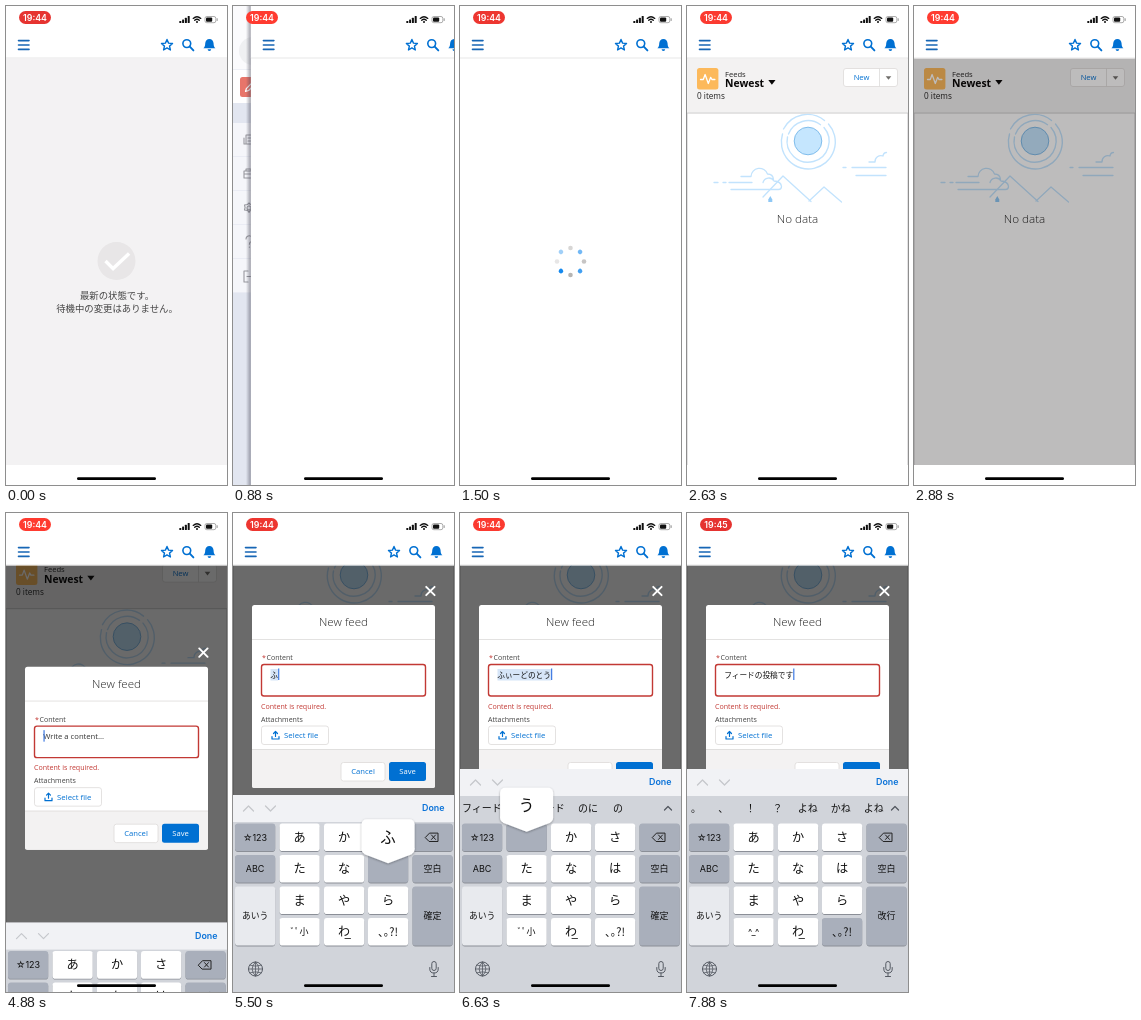
An HTML page for the animation above (8000 ms loop, 221 px wide and 479 px high).

```html
<!DOCTYPE html>
<html lang="ja">
<head>
<meta charset="utf-8">
<title>Mobile feed form</title>
<style>
  html, body { margin: 0; width: 100%; height: 100%; overflow: hidden; background: #fff; }
  svg { display: block; width: 221px; height: 479px; }
  text { font-family: "Open Sans", "Noto Sans CJK JP", "Noto Sans CJK", sans-serif; white-space: pre; }
  .jp { font-family: "Noto Sans CJK JP", "Noto Sans CJK", sans-serif; }
  .ui { font-family: Inter, "Noto Sans CJK JP", sans-serif; }
  .line { fill: none; stroke-linecap: round; stroke-linejoin: round; }
</style>
</head>
<body>
<svg id="stage" viewBox="0 0 221 479" xmlns="http://www.w3.org/2000/svg"></svg>
<script>
const LOOP = 8000;
const BLUE = '#0070d2', RED = '#c23934', DARK = '#a9afbb', BOARD = '#d1d4da';

// Markup helpers
const text = (x, y, size, str, more = '') => `<text x="${x}" y="${y}" font-size="${size}" ${more}>${str}</text>`;
const rect = (x, y, w, h, fill, more = '') => `<rect x="${x}" y="${y}" width="${w}" height="${h}" fill="${fill}" ${more}/>`;
const line = (d, stroke, width = 1, more = '') => `<path class="line" d="${d}" stroke="${stroke}" stroke-width="${width}" ${more}/>`;
const circle = (x, y, r, more) => `<circle cx="${x}" cy="${y}" r="${r}" ${more}/>`;
const MID = 'text-anchor="middle" ';

function starPoints(cx, cy, r) {
  return Array.from({ length: 10 }, (_, i) => {
    const a = i * Math.PI / 5 - Math.PI / 2, d = i % 2 ? r * .46 : r;
    return (cx + d * Math.cos(a)).toFixed(2) + ',' + (cy + d * Math.sin(a)).toFixed(2);
  }).join(' ');
}

function drawer() {
  const labels = ['保留中の変更', 'アプリケーション', '設定', 'ヘルプ', 'ログアウト'];
  const icons = [
    'M13 129h6v9h-6zM11 132v6h2M15 132h3M15 135h3',
    'M11 165h9v7h-9zM13 165v-2h5v2M11 168h9',
    'M16 197l1.5 1.5 3 .5-.6 2.5.6 2.5-3 .5-1.5 1.8-1.5-1.8-3-.5.6-2.5-.6-2.5 3-.5zM18 202a2 2 0 1 1-4 0a2 2 0 1 1 4 0',
    'M13 233a3.2 3.2 0 1 1 5 2.6q-1.6 1-1.6 2.6M16.4 241v.3',
    'M15 265h-4v11h4M14 270.5h8m-2.5-2.5l2.5 2.5-2.5 2.5'];
  return rect(0, 0, 221, 479, '#e2e6f0') + rect(0, 0, 221, 63.5, '#fbfbfd') +
    circle(20, 45, 14, 'fill="#eff0f2"') + text(42, 48, 8.4, 'ユーザー', 'fill="#333"') +
    rect(0, 64, 221, 33, '#fff', 'id="feedRow"') + rect(7, 71, 20, 20, '#e8756a', 'rx="2.5"') +
    line('M12.5 85.5l1-3.2 6.5-6.5 2.2 2.2-6.5 6.5z', '#fff', 1.2) +
    text(36, 84, 8.4, 'Feeds', 'fill="#333"') +
    labels.map((s, i) => rect(0, 117 + i * 34, 221, 33.4, '#f5f6fa') +
      line(icons[i], '#97989e', 1.1) +
      text(36, 137 + i * 34, 8.2, s, 'fill="#444"')).join('');
}

function header() {
  return rect(0, 0, 221, 52, '#fff') + rect(0, 51.6, 221, .8, '#e2e1e1') +
    line('M12.5 34.6h10.5M12.5 39h10.5M12.5 43.4h10.5', '#1766b5', 1.6) +
    `<polygon class="line" points="${starPoints(161, 39.3, 5.8)}" stroke="${BLUE}" stroke-width="1.4"/>` +
    circle(180.8, 37.6, 3.9, `fill="none" stroke="${BLUE}" stroke-width="1.6"`) +
    line('M183.8 40.6l3.6 3.8', BLUE, 1.9) +
    `<path fill="${BLUE}" d="M197.4 42.2c1.6-1.2 1.7-2.6 1.8-4.6 .1-2.8 1.8-4.6 4.2-4.6s4.1 1.8 4.2 4.6c.1 2 .2 3.4 1.8 4.6zM201.6 43.3h3.6a1.8 1.8 0 0 1-3.6 0z"/>`;
}

function pendingPage() {
  return rect(0, 52.4, 221, 406.6, '#f3f2f3') + circle(110.5, 255, 19, 'fill="#e8e6e7"') +
    line('M99.5 255l7.6 7.6 16-15', '#fff', 3.4, 'style="stroke-linecap:butt;stroke-linejoin:miter"') +
    text(111, 293, 9.4, '最新の状態です。', MID + 'class="jp" fill="#444"') +
    text(111, 306, 9.4, '待機中の変更はありません。', MID + 'class="jp" fill="#444"');
}

function listHeader() {
  return rect(0, 52, 221, 55, '#f3f2f2') + rect(0, 106.6, 221, .9, '#c9c7c8') +
    rect(10, 62, 21.4, 21.4, '#fcb95b', 'rx="2.5"') +
    line('M13.5 73.5h2.8l1.8-5 3.2 9 2.4-6.2 1.2 2.2h3', '#fff', 1.3) +
    text(38, 70.6, 7.6, 'Feeds', 'fill="#222"') +
    text(38, 81, 10.4, 'Newest', 'font-weight="700" fill="#080707"') +
    '<path d="M81.3 74h7.2l-3.6 4.8z" fill="#080707"/>' +
    text(10, 93.3, 8.2, '0 items', 'fill="#222"') +
    rect(156.5, 62.5, 54, 18, '#fff', 'id="newBtn" rx="2.5" stroke="#dddbda" stroke-width=".8"') +
    rect(192, 62.5, .8, 18, '#dddbda') +
    text(174.5, 74.3, 7.6, 'New', MID + `fill="${BLUE}"`) +
    '<path d="M198.7 70.2h5.6l-2.8 3.6z" fill="#706e6b"/>';
}

function emptyArt() {
  const pale = '#c2e3fd';
  return line('M96.5 123a27 27 0 0 1 41-8.5M141.5 118a27 27 0 1 1-46 10', pale, 1.4) +
    line('M101.5 128a21 21 0 0 1 32-9.3M137 121.5a21 21 0 1 1-36.5 9.5', pale, 1.4) +
    circle(121, 135, 13.8, 'fill="#c5e6fe" stroke="#80bdec" stroke-width="1"') +
    line('M76 191l20-21 28 25.5M122 195l15-14 17.5 15', pale, 1.3) +
    line('M42 176.5h23M27 176.5h4M36 176.5h3M44 183.5h48M54 170.5h10a8.5 8.5 0 0 1 16.5-2.5q5.5 0 6 5.5M76 176.5a6 6 0 0 1 11-1.5q7 .5 7.5 5.5 0 3-3 3', pale, 1.3) +
    line('M156 161.5h3M165 161.5h34M169 169.5h30M182 156h6a6 6 0 0 1 8-6q.5-3.5 3.5-3.5', pale, 1.3) +
    '<path d="M81.3 196v-2.5l2-3.5 2 3.5v2.5z" fill="#8fc8f5"/>' +
    text(110.5, 217, 11.7, 'No data', MID + 'font-weight="300" fill="#222"');
}

function spinner() {
  return Array.from({ length: 8 }, (_, i) =>
    `<circle r="2.3" cx="13.5" transform="rotate(${i * 45})" fill="${i % 2 ? '#1589ee' : '#b0adab'}" opacity="${.3 + i * .1}"/>`).join('');
}

// Drawn from the top edge of the dialog
function modal() {
  const border = 'rx="2.5" stroke="#dddbda" stroke-width=".8"';
  return line('M193.2 -18.2l8.4 8.4m0-8.4l-8.4 8.4', '#fff', 1.9) +
    rect(19, 0, 183, 171, '#fff', 'id="card" rx="2.5"') + rect(19, 34, 183, .8, '#dddbda') +
    text(110.5, 21, 11.6, 'New feed', MID + 'font-weight="300" fill="#222"') +
    text(29, 55, 7.07, '*', `fill="${RED}"`) + text(33.5, 55, 7.07, 'Content', 'fill="#444"') +
    rect(28.5, 59.5, 164, 31.5, '#fff', 'id="field" rx="2.5"') +
    rect(37.5, 64, 0, 11.5, '#d6e5f8', 'id="mark"') +
    text(37.3, 72.3, 7.66, 'Write a content...', 'id="hint" fill="#333"') +
    text(37.3, 72.6, 7.66, '', 'id="typed" class="jp" fill="#111"') +
    rect(37.5, 63.5, 1.1, 11.5, '#2f6fe0', 'id="caret"') +
    text(28, 103.6, 7.07, 'Content is required.', `id="error" fill="${RED}"`) +
    '<g id="lower">' + text(28, 104.5, 7.07, 'Attachments', 'fill="#444"') +
    rect(28.5, 109, 67, 18.5, '#fff', border) +
    line('M39 119.5v2.5h7v-2.5M42.5 119.5v-5m-2 2l2-2 2 2', BLUE, 1.2) +
    text(51, 121, 7.8, 'Select file', `fill="${BLUE}"`) +
    '<path d="M19 132h183v36.5q0 2.5-2.5 2.5h-178q-2.5 0-2.5-2.5z" fill="#f3f2f2"/>' +
    rect(19, 132, 183, .8, '#dddbda') +
    rect(108, 145.5, 44, 18.5, '#fff', border) + text(130, 157.4, 7.66, 'Cancel', MID + `fill="${BLUE}"`) +
    rect(156, 145, 37, 19, BLUE, 'id="save" rx="2.5"') + text(174.5, 157.4, 7.66, 'Save', MID + 'fill="#fff"') +
    '</g>';
}

const COLS = [2, 46.5, 91, 135, 179.5], ROWS = [310.5, 342, 373.5, 405];
const KANA = ['あかさ', 'たなは', 'まやら', '小わ、'];
const KEY_W = 40.2, KEY_H = 27.6;

function key(x, y, h, fill, label, size, id = '') {
  return rect(x, y + .8, KEY_W, h, '#8b8f97', 'rx="2.8"') +
    rect(x, y, KEY_W, h, fill, `rx="2.8" id="key${id}"`) +
    text(x + KEY_W / 2, y + h / 2 + size * .37, size, label, MID + `class="${size > 10 ? 'jp' : 'ui'}" id="cap${id}" fill="#111"`);
}

function keyboard() {
  const tall = KEY_H + 31.5;
  const faces = { '小': ['^_^', 9], 'わ': ['わ', 12], '、': ['､｡?!', 11] };
  const kana = KANA.map((row, r) => [...row].map((k, c) => {
    const [face, size] = faces[k] || [k, 12.2];
    return key(COLS[c + 1], ROWS[r], KEY_H, '#fff', face, size, k);
  }).join('')).join('');
  return rect(0, 282, 221, 220, BOARD) +
    '<g id="words" clip-path="url(#wordClip)"></g>' +
    line('M204.5 297l3.5-3.5 3.5 3.5', '#50555d', 1.2, 'id="more"') +
    '<g id="bar">' + rect(0, 282, 221, 27, '#f1f2f5') +
    line('M10.5 298l5-5 5 5M32.5 293l5 5 5-5', '#c6c8cc', 1.3) +
    text(211.5, 298.4, 8.9, 'Done', 'class="ui" text-anchor="end" font-weight="600" fill="#0a72d8"') + '</g>' +
    key(COLS[0], ROWS[0], KEY_H, DARK, '☆123', 9) + key(COLS[0], ROWS[1], KEY_H, DARK, 'ABC', 9) +
    key(COLS[0], ROWS[2], tall, '#e8eaee', 'あいう', 8.8) +
    key(COLS[4], ROWS[0], KEY_H, DARK, '', 9) + key(COLS[4], ROWS[1], KEY_H, DARK, '空白', 9) +
    key(COLS[4], ROWS[2], tall, DARK, '改行', 9, 'Enter') +
    line('M192.5 324.3l4-4.2h8.5v8.4h-8.5zM198.5 322l4 4.4m0-4.4l-4 4.4', '#222', 1) + kana +
    line('M112 425.5h5.5', '#111', .8) +
    circle(22.5, 456, 7, 'fill="none" stroke="#555a63"') +
    line('M15.5 456h14M22.5 449v14M22.5 449q-7 7 0 14M22.5 449q7 7 0 14M17 452.2q5.5 2 11 0M17 459.8q5.5-2 11 0', '#555a63', .8) +
    rect(198.8, 448.5, 4.4, 9, 'none', 'rx="2.2" stroke="#555a63"') +
    line('M196.8 454.5v1.5q0 4 4.2 4t4.2-4v-1.5M201 460v3.5M198.5 463.5h5', '#555a63') +
    '<g id="pop" filter="url(#soft)"></g>';
}

function statusBar() {
  const bars = [2, 3.6, 5.2, 7].map((h, i) => rect(173.3 + i * 2.8, 17 - h, 2, h, '#111', 'rx=".5"')).join('');
  return rect(13, 5, 32, 13, '#ff3b30', 'id="pill" rx="6.5"') +
    text(29, 14.7, 8.8, '19:44', MID + 'id="clock" class="ui" font-weight="600" fill="#fff"') + bars +
    line('M187.2 12.4q3.8-3.4 7.6 0M188.7 14.2q2.3-2 4.6 0', '#111', 1.3) + circle(191, 16, 1, 'fill="#111"') +
    rect(199, 10.5, 10.8, 6.2, 'none', 'rx="1.8" stroke="#8a8a8a" stroke-width=".7"') +
    rect(200, 11.5, 6.2, 4.2, '#111', 'rx="1"') + rect(210.7, 12.3, .9, 2.6, '#8a8a8a');
}

document.getElementById('stage').innerHTML = `
  <defs>
    <clipPath id="pageClip"><rect y="52.4" width="221" height="406.6"/></clipPath>
    <clipPath id="wordClip"><rect y="282" width="196.5" height="27"/></clipPath>
    <linearGradient id="edge"><stop offset="0" stop-color="#445" stop-opacity="0"/><stop offset="1" stop-color="#445" stop-opacity=".5"/></linearGradient>
    <filter id="soft" x="-30%" y="-30%" width="160%" height="160%"><feDropShadow dx="0" dy=".8" stdDeviation="1.2" flood-opacity=".35"/></filter>
  </defs>
  ${drawer()}
  <g id="main">
    ${rect(-5, 0, 5, 479, 'url(#edge)')}${rect(0, 0, 221, 479, '#fff')}
    <g clip-path="url(#pageClip)">
      <g id="pending">${pendingPage()}</g>
      <g id="list">
        ${rect(0, 52, .8, 480, '#dddbdc')}${rect(220.2, 52, .8, 480, '#dddbdc')}
        ${listHeader()}<g id="art">${emptyArt()}</g>
      </g>
      <g id="spin">${spinner()}</g>
      ${rect(0, 52, 221, 408, '#080707', 'id="shade"')}
      <g id="modal">${modal()}</g>
    </g>
    ${header()}
  </g>
  <g id="board">${keyboard()}</g>
  ${statusBar()}
  ${rect(71, 471.3, 79, 2.8, '#000', 'rx="1.4"')}`;

const $ = id => document.getElementById(id);
const set = (id, name, value) => $(id).setAttribute(name, value);
const move = (id, x, y) => set(id, 'transform', `translate(${x} ${y})`);
const show = (id, on) => set(id, 'opacity', Number(on));
const within = (t, a, b) => t >= a && t < b;

// Eased value between [time, value] points, held before the first and after the last
function track(t, [first, ...rest]) {
  let [t0, v0] = first;
  for (const [t1, v1] of rest) {
    if (t < t1) {
      const left = 1 - Math.max(0, t - t0) / (t1 - t0);
      return v1 + (v0 - v1) * left * left;
    }
    [t0, v0] = [t1, v1];
  }
  return v0;
}

// time, text in the field, key, flick direction, flicked kana
const TYPING = [
  [5480, 'ふ', 'は', 'up', 'ふ'],
  [5730, 'ふい', 'あ', 'left', 'い'],
  [5855, 'ふぃ', '小'],
  [5980, 'ふぃー', 'わ', 'right', 'ー'],
  [6105, 'ふぃーと', 'た', 'down', 'と'],
  [6230, 'ふぃーど', '小'],
  [6355, 'ふぃーどの', 'な', 'down', 'の'],
  [6480, 'ふぃーどのと', 'た', 'down', 'と'],
  [6605, 'ふぃーどのとう', 'あ', 'up', 'う'],
  [6730, 'ふぃーどのとうこ', 'か', 'down', 'こ'],
  [6855, 'ふぃーどのとうこう', 'あ', 'up', 'う'],
  [6980, 'ふぃーどのとうこうて', 'た', 'right', 'て'],
  [7230, 'ふぃーどのとうこうで', '小'],
  [7355, 'ふぃーどのとうこうです', 'さ', 'up', 'す'],
  [7480, 'フィードの投稿です'],
  [7860, 'フィードの投稿です', '、']
];
const COMMIT = 7480;
const WORDS = [
  [5600, '降 不 付 ふむ 吹 二 府'],
  [5850, 'フィ フィー フィン フィル'],
  [6100, 'フィート フィード フィールド'],
  [6230, 'フィード フィードの フィールド'],
  [6355, 'フィードの フィード のに の'],
  [6855, 'フィードの投稿 フィードの ふぃーど'],
  [7355, 'フィードの投稿です フィードの投稿'],
  [COMMIT, '。 、 ！ ？ よね かね よね']
];
const latest = (table, t) => table.filter(row => t >= row[0]).pop();
const STEP = { up: [0, -1], down: [0, 1], left: [-1, 0], right: [1, 0] };

function popup(k, dir, label) {
  const r = KANA.findIndex(row => row.includes(k)), c = KANA[r].indexOf(k) + 1;
  const [dx, dy] = STEP[dir];
  const x = COLS[c] + KEY_W / 2 + dx * 44, y = ROWS[r] + KEY_H / 2 + dy * 32;
  const w = dx ? 21 : 26.5, h = 17.5, tip = 9;
  const wedge = dx
    ? `M${x - dx * (w - 2)} ${y - h + 2}L${x - dx * w} ${y - h + 4}L${x - dx * (w + tip)} ${y}L${x - dx * w} ${y + h - 4}L${x - dx * (w - 2)} ${y + h - 2}z`
    : `M${x - w} ${y - dy * (h - 6)}L${x - w + 3} ${y - dy * h}L${x} ${y - dy * (h + tip)}L${x + w - 3} ${y - dy * h}L${x + w} ${y - dy * (h - 6)}z`;
  return rect(x - w, y - h, w * 2, h * 2, '#fff', 'rx="5"') + `<path d="${wedge}" fill="#fff"/>` +
    text(x, y + 5.7, 15.5, label, MID + 'class="jp" fill="#111"');
}

function wordRow(t) {
  let x = -4.6;
  const row = latest(WORDS, t);
  return !row ? '' : row[1].split(' ').map(word => {
    const w = Math.max(27.2, 13 + 10 * word.length);
    x += w;
    return text((x - w / 2).toFixed(1), 299, 10, word, MID + 'class="jp" fill="#111"');
  }).join('');
}

function renderTyping(t) {
  const step = latest(TYPING, t), typed = step ? step[1] : '';
  const composing = Boolean(step) && t < COMMIT;
  $('typed').textContent = typed;
  const width = typed ? $('typed').getComputedTextLength() : 0;
  set('mark', 'width', composing ? width : 0);
  set('caret', 'x', 37.5 + width);
  show('caret', t >= 4700);
  show('hint', !typed);

  const pressed = step && t < step[0] + 105 ? step[2] : '';
  for (const k of KANA.join('')) {
    set('key' + k, 'fill', k === pressed ? DARK : '#fff');
    show('cap' + k, k !== pressed || !step[3]);
  }
  $('cap小').textContent = composing ? 'ﾞﾟ小' : '^_^';
  $('capEnter').textContent = composing ? '確定' : '改行';
  $('pop').innerHTML = pressed && step[3] ? popup(step[2], step[3], step[4]) : '';
  $('words').innerHTML = wordRow(t);
  const open = t >= WORDS[0][0];
  show('more', open);
  move('bar', 0, open ? -26 : 0);
}

function render(t) {
  move('main', track(t, [[60, 0], [460, 187], [660, 187], [980, 0]]), 0);
  set('feedRow', 'fill', within(t, 540, 700) ? '#e6ebf5' : '#fff');
  show('pending', t < 690);

  const scroll = track(t, [[4837, 0], [5380, -73]]);
  show('list', t >= 1600);
  move('list', 0, scroll);
  show('art', track(t, [[2150, 0], [2350, 1]]));
  show('spin', within(t, 1060, 2150));
  set('spin', 'transform', `translate(110.5 255.5) rotate(${Math.floor(t / 125) * 45})`);
  set('newBtn', 'fill', within(t, 2700, 2850) ? '#e4e9f0' : '#fff');

  const failed = t >= 4370, grow = failed ? 12 : 0;
  show('shade', track(t, [[2820, 0], [3060, .6]]));
  show('modal', track(t, [[3060, 0], [3350, 1]]));
  move('modal', 0, 171 - grow / 2 + scroll + track(t, [[3060, 14], [3400, 0]]));
  set('card', 'height', 171 + grow);
  move('lower', 0, grow);
  show('error', failed);
  set('field', 'stroke', failed ? RED : '#d0cecd');
  set('field', 'stroke-width', failed ? 1.4 : .8);
  set('save', 'fill', within(t, 4230, 4370) ? '#005fb2' : BLUE);

  move('board', 0, track(t, [[4760, 197], [5380, 0]]));
  renderTyping(t);

  const glow = Math.cos((t - 880) / 1000 * Math.PI);
  set('pill', 'fill', `rgb(${242 + 13 * glow} ${55 + 4 * glow} 48)`);
  $('clock').textContent = t < 7000 ? '19:44' : '19:45';
}

const start = performance.now();
function tick() {
  render((performance.now() - start) % LOOP);
  requestAnimationFrame(tick);
}
tick();
</script>
</body>
</html>
```
